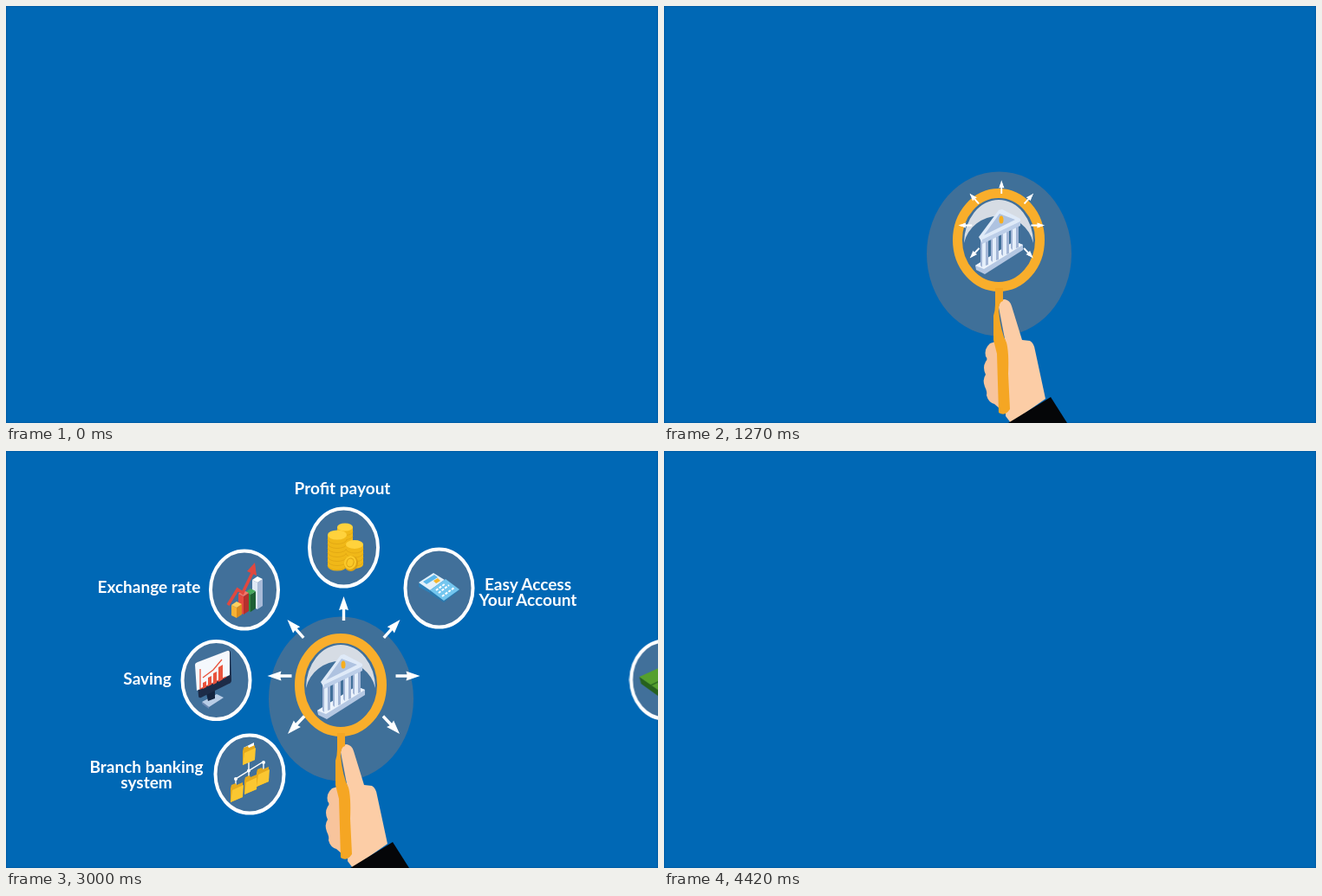
These frames come from a looping animation (752 by 482 pixels, 4880 ms). An HTML page:

```html
<!DOCTYPE html>
<html lang="en">
<head>
<meta charset="utf-8">
<title>Banking Systems</title>
<style>
  html, body { margin: 0; width: 100%; height: 100%; overflow: hidden; background: #0068b5; }
  body { box-shadow: inset 0 0 2px rgba(0, 40, 100, .6); }
  svg { display: block; width: 100%; height: 100%; }
  text { fill: #fff; text-anchor: middle; }
  #title text { font: 300 62px Lato, "Open Sans", sans-serif; }
  .label { font: 700 19px Lato, "Open Sans", sans-serif; }
  .ring { fill: #41709a; stroke: #fff; stroke-width: 4; }
  .line { fill: none; stroke: #fff; stroke-width: 1.4; }
  #disc { transform-origin: 386.5px 286.5px; }
  #arrows { transform-origin: 389px 245px; fill: #fff; }
</style>
</head>
<body>
<svg viewBox="0 0 752 482" preserveAspectRatio="none">
  <defs>
    <g id="folder">
      <path d="M-7-4L-6-8L-1-10L0-8L7-11V6L-7 12Z" fill="#e5a91c"/>
      <path d="M-5-2L8-8L7 6L-7 12Z" fill="#fbc731"/>
    </g>
    <g id="column">
      <path d="M0 0L7-3V29L0 32Z" fill="#e4eefa"/>
      <path d="M0 0L-2-2V30L0 32ZM4-2L7-3V29L4 30Z" fill="#a3b6d6"/>
    </g>
  </defs>

  <g id="scene">
    <ellipse id="disc" cx="386.5" cy="286.5" rx="83.5" ry="95" fill="#3f7099"/>

    <g id="glass">
      <ellipse cx="386" cy="270.5" rx="42" ry="49" fill="#41709a"/>
      <path d="M346 274A40 50 0 0 1 426 274A41 40 0 0 0 346 274Z" fill="#d6dce4"/>
      <g id="bank">
        <path d="M359 300L404 272L414 276V282L370 310L360 305Z" fill="#b4c7e2"/>
        <path d="M359 300L404 272L414 276L369 304Z" fill="#edf4fc"/>
        <use href="#column" x="367" y="270"/>
        <use href="#column" x="379" y="264"/>
        <use href="#column" x="391" y="257"/>
        <use href="#column" x="402" y="250"/>
        <path d="M363 267L386 236L390 235L411 246V253L367 274Z" fill="#dfeaf8"/>
        <path d="M369 265L387 240L405 247Z" fill="#aec2e0"/>
        <path d="M367 270L411 249V254L367 275Z" fill="#bccee8"/>
        <ellipse cx="389" cy="247" rx="2.5" ry="4.5" fill="#f7ae1d"/>
      </g>
      <ellipse cx="386" cy="270.5" rx="47.5" ry="54" fill="none" stroke="#f9ae2b" stroke-width="11"/>
      <path d="M382 388L376 390Q369 396 371 405Q374 408 371 411Q367 418 371 426Q367 432 370 440Q373 446 372 450Q374 458 381 460L388 466V400Z" fill="#f8c49c"/>
      <path d="M386 348Q387 339 393 339Q399 340 401 347L413 386L422 387Q427 390 428 398L440 454L400 482L394 474L395 395Z" fill="#fccda6"/>
      <path d="M382 326H391V341Q386 342 386 352Q388 376 395 389Q398 400 397 425L399 466Q393 475 386 470L384 402L380 386V358Q382 352 382 345Z" fill="#f5a623"/>
      <path d="M397 482L446 452L465 482Z" fill="#050608"/>
    </g>
    <g id="arrows"></g>

    <g id="branch">
      <ellipse class="ring" cx="281" cy="373.5" rx="39.5" ry="45"/>
      <path class="line" d="M280 360V394M265 390V379L297 359V372"/>
      <g fill="#fff"><circle cx="265" cy="379" r="2"/><circle cx="280" cy="369.5" r="2"/><circle cx="297" cy="360" r="2"/></g>
      <path d="M274 343L286 337V350L274 355Z" fill="#fff"/>
      <use href="#folder" x="280" y="351"/>
      <use href="#folder" x="266" y="394"/>
      <use href="#folder" x="282" y="385"/>
      <use href="#folder" x="296" y="376"/>
    </g>

    <g id="saving">
      <ellipse class="ring" cx="242.5" cy="265" rx="39" ry="45"/>
      <path d="M226 290L243 281L251 285L234 296Z" fill="#b9cde6"/>
      <path d="M226 290L234 296V298L226 292Z" fill="#6f89b3"/>
      <path d="M231 280L241 276V286L233 289Z" fill="#14243f"/>
      <path d="M219 247Q219 245 222 244L256 231Q259 230 259 233L260 265Q260 268 257 269L225 285Q222 286 222 283Z" fill="#1d2c48"/>
      <path d="M218 247Q218 245 221 244L255 231Q258 230 258 233V259L220 277Z" fill="#f5f8fd"/>
      <path d="M227 268L231 266V273L227 275ZM233 262L237 260V270L233 272ZM239 257L243 255V268L239 270ZM245 250L250 247V264L245 267Z" fill="#e9533d"/>
      <path d="M227 262L235 256L239 253L249 241M224 252V275L254 261" fill="none" stroke="#e9533d" stroke-width="1.3"/>
    </g>

    <g id="exchange">
      <ellipse class="ring" cx="275" cy="160.5" rx="39" ry="45"/>
      <g id="bars"></g>
      <path d="M256 178L267 160L273 164L285 139" fill="none" stroke="#e0483f" stroke-width="3.5"/>
      <path d="M287 129L278 139L289 144Z" fill="#e0483f"/>
    </g>

    <g id="profit">
      <ellipse class="ring" cx="389.5" cy="111.5" rx="39.5" ry="45"/>
      <g id="coins"></g>
      <ellipse cx="398" cy="130" rx="8" ry="9" fill="#dca012" transform="rotate(20 398 130)"/>
      <ellipse cx="397" cy="129" rx="7" ry="8" fill="#fbc928" transform="rotate(20 397 129)"/>
      <ellipse cx="397" cy="129" rx="4" ry="5" fill="none" stroke="#dca012" transform="rotate(20 397 129)"/>
    </g>

    <g id="access">
      <ellipse class="ring" cx="499.5" cy="158.5" rx="39" ry="45"/>
      <path d="M476 153L493 142L514 155L498 169L476 157Z" fill="#2c7fb8"/>
      <path d="M476 152L493 141L514 154L498 167Z" fill="#e2f1fb"/>
      <path d="M481 151L494 143L498 146L485 154Z" fill="#5bb6ea"/>
      <path d="M489 161L507 148L523 161L505 175L489 165Z" fill="#2a78ad"/>
      <path d="M489 161L507 148L523 160L505 173Z" fill="#74c6ef"/>
      <path d="M493 150L498 147L501 150L496 153Z" fill="#f6b62c"/>
      <path d="M496 161L507 153M499 164L511 155M503 168L517 158" stroke="#fff" stroke-width="2" stroke-dasharray="3 1.5"/>
    </g>

    <g id="business">
      <ellipse class="ring" cx="530.5" cy="264.5" rx="39" ry="45"/>
      <path d="M533 252L537 246Q540 243 544 246L553 254" fill="none" stroke="#1d3f16" stroke-width="3"/>
      <path d="M501 261L528 279V287L503 269Z" fill="#26611d"/>
      <path d="M528 279L561 263V270L530 287Z" fill="#357a22"/>
      <path d="M501 261L534 246L561 263L528 280Z" fill="#55a02d"/>
      <path d="M514 271L547 255" stroke="#2f7020" stroke-width="1.5"/>
      <path d="M535 274L539 272V278L535 280ZM551 266L555 264V270L551 272Z" fill="#f5c22e"/>
    </g>

    <g id="tablet">
      <ellipse class="ring" cx="492" cy="373" rx="39" ry="45"/>
      <path d="M460 373L497 351L525 372V376L488 395Q486 396 484 394L460 377Z" fill="#1d3558"/>
      <path d="M460 373Q460 371 463 370L495 350Q497 349 499 350L524 371Q526 373 523 374L488 392Q486 393 484 391Z" fill="#f2f7fb"/>
      <path d="M464 372L496 353L517 371L486 388Z" fill="#2fbfcc"/>
      <ellipse cx="491" cy="371" rx="13" ry="10" fill="none" stroke="#d9f7f8" stroke-width="1.5" stroke-dasharray="14 3"/>
      <path d="M485 366L498 369L493 372L496 377L493 378L490 373L487 376Z" fill="#fff"/>
      <path d="M507 382L514 378" stroke="#1d3558" stroke-width="2"/>
    </g>
  </g>
  <g id="title"></g>
</svg>

<script>
const LOOP = 4880;
const $ = id => document.getElementById(id);

function add(parent, tag, attrs, text) {
  const el = document.createElementNS('http://www.w3.org/2000/svg', tag);
  for (const k in attrs) el.setAttribute(k, attrs[k]);
  if (text) el.textContent = text;
  return parent.appendChild(el);
}

// keys: [ms, value, easing to the next key]
function play(el, prop, keys) {
  const all = [[0, keys[0][1]], ...keys, [LOOP, keys[keys.length - 1][1]]];
  el.animate(all.map(([ms, value, easing = 'linear']) =>
    ({ offset: ms / LOOP, [prop]: value, easing })), { duration: LOOP, iterations: Infinity });
}

const OUT = 'cubic-bezier(.215,.61,.355,1)';
const OUT_SOFT = 'cubic-bezier(.25,.46,.45,.94)';
const IN = 'cubic-bezier(.55,.06,.68,.19)';
const move = (x, y) => `translate(${x}px, ${y}px)`;

// Title letters rise one after another, then leave upwards
const spots = [161, 199, 233, 266, 283, 306, 342, 394, 429, 462, 484, 506, 551, 594];
[...'BankingSystems'].forEach((ch, i) => {
  const el = add($('title'), 'text', { x: spots[i], y: 255 }, ch);
  const start = 60 + 20 * i, leave = 610 + 12 * i;
  play(el, 'transform', [
    [start, move(0, 290), OUT], [start + 195, move(0, -4)], [start + 260, move(0, 0)],
    [leave, move(0, 0), IN], [leave + 210, move(0, -290)]
  ]);
});

// Magnifier and arrows
play($('disc'), 'transform', [[840, 'scale(0)', OUT], [1120, 'scale(1)']]);
play($('glass'), 'transform', [[800, move(0, 300), OUT], [1120, move(0, 0)]]);
[[389.5, 168, 0], [454.5, 195, 42], [477.5, 260, 90], [454, 327, 137],
 [325, 327, -137], [301.5, 260, -90], [324.5, 195, -42]].forEach(([x, y, turn]) =>
  add($('arrows'), 'path', {
    d: 'M0 0L5.5 16L1.7 15V28H-1.7V15L-5.5 16Z',
    transform: `translate(${x} ${y}) rotate(${turn})`
  }));
play($('arrows'), 'transform', [[1180, 'scale(0)', OUT_SOFT], [1460, 'scale(1)']]);

// Isometric bars and coin stacks
function bar(x, top, base, left, right, lid) {
  const g = $('bars');
  add(g, 'path', { d: `M${x} ${top}l6 3V${base}l-6 -3Z`, fill: left });
  add(g, 'path', { d: `M${x + 6} ${top + 3}l6 -4V${base - 4}l-6 4Z`, fill: right });
  add(g, 'path', { d: `M${x} ${top}l6 -4l6 3l-6 4Z`, fill: lid });
}
bar(284, 149, 183, '#dfe8f5', '#a9bbd8', '#fff');
bar(276, 163, 186, '#2f8a45', '#1d5f33', '#46a95c');
bar(268, 165, 189, '#e5493f', '#b5302d', '#f2766a');
bar(260, 178, 193, '#f9b233', '#d98b1d', '#ffd05f');

function stack(x, top, base, rx) {
  const g = $('coins'), ry = rx * .5;
  const arc = y => `M${x - rx} ${y}A${rx} ${ry} 0 0 0 ${x + rx} ${y}`;
  add(g, 'path', { d: `${arc(base)}V${top}H${x - rx}Z`, fill: '#f0b818' });
  for (let y = top + 5; y < base; y += 5)
    add(g, 'path', { d: arc(y), fill: 'none', stroke: '#e0a614', 'stroke-width': .8 });
  add(g, 'ellipse', { cx: x, cy: top, rx, ry, fill: '#ffd23c' });
}
stack(391, 88, 126, 9);
stack(382, 97, 133, 11);
stack(402, 108, 131, 10);

// Each badge slides in while its label is typed
const TYPE = 280;
function badge(id, t, from, lines) {
  play($(id), 'transform', [[t, move(...from), OUT], [t + 300, move(0, 0)]]);
  const total = lines.reduce((n, line) => n + line[0].length, 0);
  let k = 0;
  for (const [words, x, y, anchor = 'middle'] of lines) {
    const line = add($('scene'), 'text', { class: 'label', x, y, style: `text-anchor:${anchor}` });
    for (const ch of words) {
      const at = t + 60 + TYPE * k++ / total;
      const el = add(line, 'tspan', {}, ch);
      play(el, 'fillOpacity', [[at, 0, 'step-end'], [at, 1]]);
    }
  }
}
badge('branch', 1310, [-326, 0], [['Branch banking', 162, 372], ['system', 162, 390]]);
badge('saving', 1640, [-290, 0], [['Saving', 163, 270]]);
badge('exchange', 1990, [-320, 0], [['Exchange rate', 165, 164]]);
badge('profit', 2280, [0, -162], [['Profit payout', 388, 50]]);
badge('access', 2619, [301, 0], [['Easy Access', 602, 161], ['Your Account', 602, 179]]);
badge('business', 2985, [270, 0], [['Business', 623, 263], ['Credibility', 623, 281]]);
badge('tablet', 3350, [308, 0], [['Convenience', 548, 382, 'start']]);

play($('scene'), 'opacity', [[0, 1], [4000, 1], [4420, 0]]);
</script>
</body>
</html>
```
